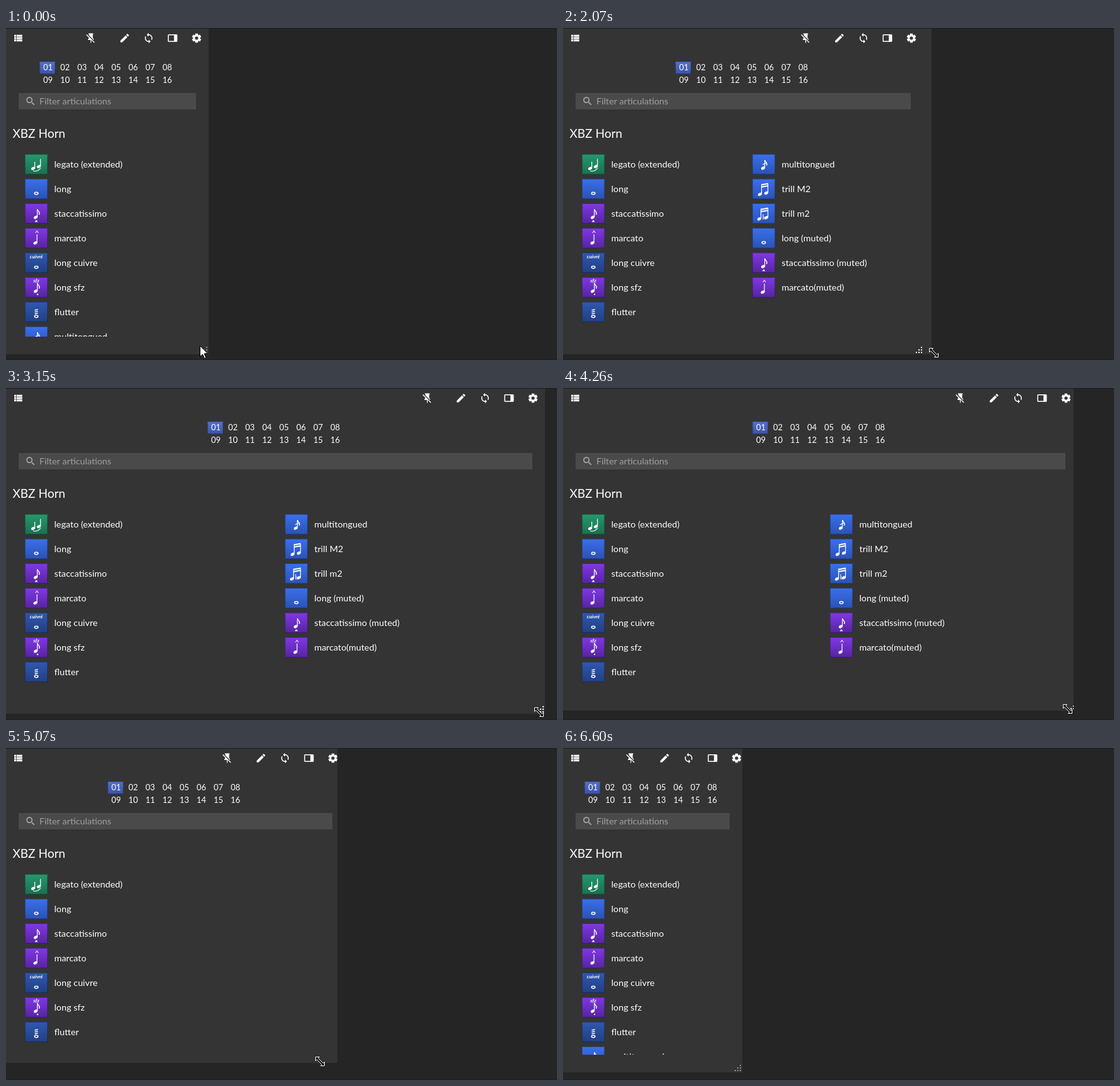
Animation, 873 px wide and 526 px high, one loop 7630 ms. Source, as an HTML page with a canvas:

```html
<!DOCTYPE html>
<html lang="en">
<head>
<meta charset="utf-8">
<title>Resizable articulation panel</title>
<style>
  html, body { margin: 0; width: 100%; height: 100%; overflow: hidden; background: #252525; }
  canvas { display: block; }
</style>
</head>
<body>
<canvas id="stage" width="873" height="526"></canvas>
<script>
const ctx = document.getElementById('stage').getContext('2d');
const LOOP = 7630, STEP = 90;
const FONT = 'Lato, Carlito, sans-serif';

// time, panel width, layout width, pointer x, pointer y
const KEYS = [
  [1020, 321, 321, 311, 514],
  [1380, 377, 372, 376, 513],
  [1800, 475, 465, 476, 515],
  [2070, 584, 571, 587, 514],
  [2610, 779, 771, 783, 513],
  [2700, 799, 794, 797, 513],
  [3150, 854, 854, 844, 513],
  [3810, 854, 854, 844, 513],
  [4260, 809, 816, 799, 508],
  [4620, 720, 732, 700, 504],
  [5070, 525, 537, 497, 496],
  [5430, 380, 391, 352, 498],
  [6240, 287, 288, 277, 511],
  [6600, 284, 284, 274, 511]
];

const ICONS = {
  list: 'M9 5V9H21V5M9 19H21V15H9M9 14H21V10H9M4 9H8V5H4M4 19H8V15H4M4 14H8V10H4V14Z',
  pinOff: 'M2 5.27L3.28 4L20 20.72L18.73 22L12.8 16.07V22H11.2V16H6V14L8 12V11.27L2 5.27M16 12L18 14V16H17.82L8 6.18V4H7V2H17V4H16V12Z',
  edit: 'M3 17.25V21h3.75L17.81 9.94l-3.75-3.75L3 17.25zM20.71 7.04c.39-.39.39-1.02 0-1.41l-2.34-2.34c-.39-.39-1.02-.39-1.41 0l-1.83 1.83 3.75 3.75 1.83-1.83z',
  sync: 'M12 4V1L8 5l4 4V6c3.31 0 6 2.69 6 6 0 1.01-.25 1.97-.7 2.8l1.46 1.46C19.54 15.03 20 13.57 20 12c0-4.42-3.58-8-8-8zm0 14c-3.31 0-6-2.69-6-6 0-1.01.25-1.97.7-2.8L5.24 7.74C4.46 8.97 4 10.43 4 12c0 4.42 3.58 8 8 8v3l4-4-4-4v3z',
  dock: 'M20 4H4A2 2 0 0 0 2 6V18A2 2 0 0 0 4 20H20A2 2 0 0 0 22 18V6A2 2 0 0 0 20 4M15 18H4V6H15V18Z',
  search: 'M15.5 14h-.79l-.28-.27C15.41 12.59 16 11.11 16 9.5 16 5.91 13.09 3 9.5 3S3 5.91 3 9.5 5.91 16 9.5 16c1.61 0 3.09-.59 4.23-1.57l.27.28v.79l5 4.99L20.49 19l-4.99-5zm-6 0C7.01 14 5 11.99 5 9.5S7.01 5 9.5 5 14 7.01 14 9.5 11.99 14 9.5 14z'
};
for (const name in ICONS) ICONS[name] = new Path2D(ICONS[name]);

const COLORS = {
  green: ['#26986c', '#1b7051'],
  blue: ['#3a70ec', '#2a52b4'],
  navy: ['#2f58b2', '#223f80'],
  purple: ['#8038e6', '#56249f']
};

const ITEMS = [
  ['legato (extended)', 'green', slurred],
  ['long', 'blue', whole],
  ['staccatissimo', 'purple', wedged],
  ['marcato', 'purple', marcato],
  ['long cuivre', 'navy', () => { caption('cuivré', 9); whole(); }],
  ['long sfz', 'purple', () => { caption('sfz', 8); eighth(); dot(20, 27, 1.2); }],
  ['flutter', 'navy', () => { whole(); [12, 15, 18].forEach(y => line(15.5, y + 1, 20.5, y, 1.5)); }],
  ['multitongued', 'blue', () => { eighth(); line(16, 16.5, 22, 14, 1.3); }],
  ['trill M2', 'blue', () => beamed(12, 23)],
  ['trill m2', 'blue', () => { beamed(11, 23); flat(17, 17); }],
  ['long (muted)', 'blue', whole],
  ['staccatissimo (muted)', 'purple', wedged],
  ['marcato(muted)', 'purple', marcato]
];

function line(x1, y1, x2, y2, width = 1.2) {
  ctx.lineWidth = width;
  ctx.beginPath();
  ctx.moveTo(x1, y1);
  ctx.lineTo(x2, y2);
  ctx.stroke();
}

function polygon(points) {
  ctx.beginPath();
  points.forEach(([x, y]) => ctx.lineTo(x, y));
  ctx.closePath();
}

function dot(x, y, r) {
  ctx.beginPath();
  ctx.arc(x, y, r, 0, 7);
  ctx.fill();
}

function note(x, y, top) {
  ctx.beginPath();
  ctx.ellipse(x, y, 3.2, 2.3, -0.45, 0, 7);
  ctx.fill();
  line(x + 2.6, y - 0.5, x + 2.6, top);
}

function whole() {
  ctx.lineWidth = 1.5;
  ctx.beginPath();
  ctx.ellipse(18, 23, 2.8, 1.7, 0, 0, 7);
  ctx.stroke();
}

function eighth() {
  note(17, 22, 9);
  ctx.lineWidth = 1.3;
  ctx.beginPath();
  ctx.moveTo(19.8, 9);
  ctx.bezierCurveTo(20, 13, 25, 13, 22.5, 18);
  ctx.stroke();
}

function wedged() {
  eighth();
  polygon([[18, 26], [15.5, 29.3], [20.5, 29.3]]);
  ctx.fill();
}

function marcato() {
  note(16.5, 23.5, 10);
  line(16.8, 8, 19, 4, 1);
  line(19, 4, 21.2, 8, 1);
}

function slurred() {
  note(13, 22.5, 12);
  note(22, 19.5, 7.5);
  ctx.lineWidth = 1.1;
  ctx.beginPath();
  ctx.moveTo(13, 26.5);
  ctx.quadraticCurveTo(21, 28, 25, 21.5);
  ctx.stroke();
}

function beamed(left, right) {
  note(left, 24.5, 10);
  note(right - 1, 22.5, 8);
  [9.5, 13].forEach(y => line(left + 2, y, right + 2, y - 2, 2));
}

function flat(x, y) {
  line(x, y, x, y + 8, 1);
  ctx.beginPath();
  ctx.arc(x + 0.6, y + 6, 1.7, -2, 2);
  ctx.stroke();
}

function caption(label, y) {
  ctx.textAlign = 'center';
  text(label, 18, y, 8, '#fff', 'italic bold');
  ctx.textAlign = 'left';
}

function text(label, x, y, size, color = '#fff', style = '') {
  ctx.font = `${style} ${size}px ${FONT}`;
  ctx.fillStyle = color;
  ctx.fillText(label, x, y);
}

function icon(name, cx, cy, color = '#fff', size = 18) {
  ctx.save();
  ctx.translate(cx - size / 2, cy - size / 2);
  ctx.scale(size / 24, size / 24);
  ctx.fillStyle = color;
  ctx.fill(ICONS[name], 'evenodd');
  ctx.restore();
}

function gear(cx, cy) {
  ctx.fillStyle = '#fff';
  ctx.beginPath();
  for (let i = 0; i < 6; i++) {
    const a = i * Math.PI / 3 + Math.PI / 6;
    [[-0.44, 5.4], [-0.28, 7.6], [0.28, 7.6], [0.44, 5.4]].forEach(([d, r]) =>
      ctx.lineTo(cx + r * Math.sin(a + Math.PI / 6 + d), cy + r * Math.cos(a + Math.PI / 6 + d)));
  }
  ctx.closePath();
  ctx.moveTo(cx + 2.6, cy);
  ctx.arc(cx, cy, 2.6, 0, Math.PI * 2);
  ctx.fill('evenodd');
}

function shaded(x, y, w, h, [top, bottom]) {
  const g = ctx.createLinearGradient(0, y, 0, y + h);
  g.addColorStop(0, top);
  g.addColorStop(1, bottom);
  ctx.fillStyle = g;
  ctx.fillRect(x, y, w, h);
  ctx.strokeStyle = 'rgba(0,0,0,.3)';
  ctx.lineWidth = 1;
  ctx.strokeRect(x + 0.5, y + 0.5, w - 1, h - 1);
}

function toolbar(width) {
  const right = Math.max(width - 19, 275);
  icon('list', 19, 16);
  icon('pinOff', right - 167.5, 16);
  icon('edit', right - 114, 16);
  icon('sync', right - 76, 16);
  icon('dock', right - 38, 16);
  gear(right, 16);
}

function channels(width) {
  const left = Math.floor(width / 2 - 94.5);
  shaded(left - 13, 53, 25, 20, ['#5570cc', '#3c53a4']);
  ctx.textAlign = 'center';
  for (let i = 0; i < 16; i++) {
    text(String(i + 1).padStart(2, '0'), left + (i % 8) * 27 + 0.5, i < 8 ? 67 : 87, 13);
  }
  ctx.textAlign = 'left';
}

function searchBox(width) {
  ctx.fillStyle = '#4a4a4a';
  ctx.fillRect(20, 103, width - 40, 26);
  icon('search', 39, 116, '#b0b0b0');
  text('Filter articulations', 53, 121, 14.3, '#a0a0a0');
}

function articulations(width, height) {
  ctx.save();
  ctx.beginPath();
  ctx.rect(0, 190, width, height - 28 - 190);
  ctx.clip();
  const rows = width >= 560 ? 7 : ITEMS.length;
  ITEMS.forEach(([label, color, glyph], i) => {
    const x = i < rows ? 30 : Math.floor(width / 2 + 15);
    const y = 200 + (i % rows) * 39;
    shaded(x, y, 36, 32, COLORS[color]);
    text(label, x + 46.5, y + 21, 14.3);
    ctx.save();
    ctx.translate(x, y);
    ctx.fillStyle = ctx.strokeStyle = '#fff';
    glyph();
    ctx.restore();
  });
  ctx.restore();
}

function grip(width, height, active) {
  ctx.fillStyle = active ? '#fff' : '#8c8c8c';
  for (let row = 0; row < 3; row++) {
    for (let col = 0; col < 3 - row; col++) {
      ctx.fillRect(width - 4 - col * 4, height - 4 - row * 4, 2, 2);
    }
  }
}

function resizePointer(x, y) {
  const half = [[-7, -7], [-1, -7], [-3, -5], [5, 3], [7, 1]];
  ctx.save();
  ctx.translate(x + 0.5, y + 0.5);
  polygon([...half, ...half.map(([a, b]) => [-a, -b])]);
  ctx.fillStyle = '#000';
  ctx.strokeStyle = '#fff';
  ctx.lineWidth = 1;
  ctx.fill();
  ctx.stroke();
  ctx.restore();
}

function arrowPointer(x, y) {
  ctx.save();
  ctx.translate(x + 0.5, y + 0.5);
  polygon([[0, 0], [0, 17], [4, 13.5], [7, 20], [9.5, 19], [6.5, 12.5], [11.5, 12]]);
  ctx.fillStyle = '#fff';
  ctx.strokeStyle = '#000';
  ctx.lineWidth = 1;
  ctx.fill();
  ctx.stroke();
  ctx.restore();
}

// Monotone cubic through KEYS: smooth without overshoot.
function slope(i, c) {
  if (i === 0 || i === KEYS.length - 1) return 0;
  const rate = k => (KEYS[k + 1][c] - KEYS[k][c]) / (KEYS[k + 1][0] - KEYS[k][0]);
  const a = rate(i - 1), b = rate(i);
  return a * b > 0 ? 2 * a * b / (a + b) : 0;
}

function pose(t) {
  const last = KEYS.length - 1;
  if (t <= KEYS[0][0]) return KEYS[0].slice(1);
  if (t >= KEYS[last][0]) return KEYS[last].slice(1);
  const i = KEYS.findIndex(k => k[0] > t) - 1;
  const a = KEYS[i], b = KEYS[i + 1], span = b[0] - a[0];
  const u = (t - a[0]) / span, s = u * u * (3 - 2 * u);
  return [1, 2, 3, 4].map(c => Math.round(
    a[c] + (b[c] - a[c]) * s +
    span * u * (1 - u) * ((1 - u) * slope(i, c) - u * slope(i + 1, c))));
}

// The screen refreshes in discrete steps, restarting at each base time.
function quantize(t) {
  const base = [3900, 1800, 1110, 560, 0].find(b => t >= b);
  return base + Math.floor((t - base) / STEP) * STEP;
}

function pointer(t, x, y) {
  if (t < 560) arrowPointer(307, 503);
  else if (t < 650) arrowPointer(304, 503);
  else if (t < 6420) resizePointer(x, y);
  else if (t < 6510) arrowPointer(x, y - 6);
  else if (t < 6600) arrowPointer(x, y + 4);
}

function draw(now) {
  const t = quantize(now % LOOP);
  const [panel, layout, x, y] = pose(t);
  const height = y + 3;

  ctx.fillStyle = '#252525';
  ctx.fillRect(0, 0, 873, 526);
  ctx.save();
  ctx.beginPath();
  ctx.rect(0, 0, panel, height);
  ctx.clip();
  ctx.fillStyle = '#343434';
  ctx.fillRect(0, 0, panel, height);
  toolbar(layout);
  channels(layout);
  searchBox(layout);
  text('XBZ Horn', 10.5, 174, 19);
  articulations(layout, height);
  grip(layout, height, t >= 560 && t < 6420);
  ctx.restore();

  ctx.fillStyle = '#1e1e1e';
  ctx.fillRect(0, 0, 873, 1);
  ctx.fillRect(0, 525, 873, 1);
  pointer(t, x, y);
}

const start = performance.now();
function tick() {
  draw(performance.now() - start);
  requestAnimationFrame(tick);
}
tick();
</script>
</body>
</html>
```
